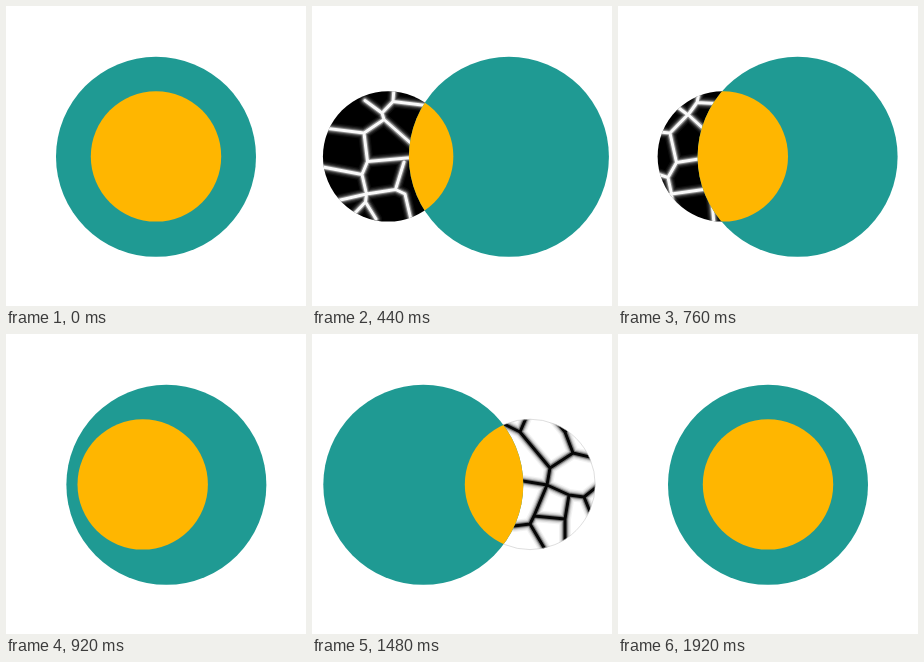
Write an HTML page with a canvas that moves like this. It is 300 by 300 pixels and loops after 1960 ms.

```html
<!DOCTYPE html>
<html lang="en">
<head>
<meta charset="utf-8">
<title>Two circles</title>
<style>
  html, body { margin: 0; width: 100%; height: 100%; overflow: hidden; background: #fff; }
  canvas { display: block; width: 300px; height: 300px; }
</style>
</head>
<body>
<canvas id="stage" width="300" height="300"></canvas>
<script>
const ctx = document.getElementById('stage').getContext('2d');
const LOOP = 1960, STEP = 40, SWAP = 960;
const TEAL = '#1f9a93', ORANGE = '#ffb600';

// Keys: time, offset of the big circle, offset of the small one, skew of the ease
const KEYS = [
  [0, 0, 0, 1],
  [455, 47, -74, 0.85],
  [1480, -38.7, 68, 1],
  [1920, 0, 0, 1]
];

// Cell walls: nodes are x, y and drift; walls are chains of nodes
const LEFT = {
  start: 280,
  nodes: {
    a: [82, 82, 0, 0], b: [82, 95, -2, 1], c: [114, 100, 0, -1],
    d: [70, 106, 0, 2], e: [52, 93, 2, 3], f: [73, 116, -2, -5],
    g: [52, 127, 0, 0], h: [8, 121, 0, 1], i: [54, 155, 3, 1],
    j: [106, 152, 0, -2], k: [50, 167, 0, 3], l: [8, 162, 0, -3],
    m: [55, 188, -1, 0], n: [79, 184, 9, -1], o: [92, 160, 0, -8],
    p: [93, 190, 0, -4], q: [102, 218, -4, 0], r: [53, 196, 1, 0],
    s: [42, 206, 2, 2], t: [64, 213, 0, 0], u: [24, 195, 0, 0],
    v: [102, 141, 0, -2]
  },
  walls: 'abc bdfg ed fv hgikl ij kmnpq no umrs rt'
};
const RIGHT = {
  start: 1160,
  nodes: {
    a: [211, 88, -3, 10], b: [218, 76, -4, 8], c: [192, 90, 0, 0],
    d: [237, 132, 1, 2], e: [261, 117, 0, 2], f: [253, 97, 0, 1],
    g: [240, 82, 0, 0], h: [265, 84, 0, 0], i: [286, 125, 0, 0],
    j: [233, 150, 2, 1], k: [205, 146, 0, 0], l: [255, 160, 2, 1],
    m: [227, 184, -5, -2], n: [254, 186, -1, -1], o: [253, 214, 0, 0],
    p: [272, 163, 0, 0], q: [287, 151, 0, 0], r: [281, 185, 0, 0],
    s: [218, 190, 0, 0], t: [234, 217, 0, 0], u: [202, 192, 0, 0]
  },
  walls: 'cadefg ab fh ei djk jlpq jmsu st mnl no pr'
};

const ease = p => (1 - Math.cos(Math.PI * p)) / 2;

function offsets(t) {
  const n = KEYS.findIndex(k => t < k[0]);
  if (n < 0) return [0, 0];
  const from = KEYS[n - 1], to = KEYS[n];
  const p = ease(((t - from[0]) / (to[0] - from[0])) ** to[3]);
  return [1, 2].map(i => from[i] + (to[i] - from[i]) * p);
}

function disc(x, y, r) {
  ctx.beginPath();
  ctx.arc(x, y, r, 0, Math.PI * 2);
}

function fillDisc(x, y, r, color) {
  disc(x, y, r);
  ctx.fillStyle = color;
  ctx.fill();
}

function drawWalls(net, t, rgb) {
  const age = (t - net.start) / 320;
  ctx.beginPath();
  for (const chain of net.walls.split(' ')) {
    [...chain].forEach((id, i) => {
      const [x, y, dx, dy] = net.nodes[id];
      ctx[i ? 'lineTo' : 'moveTo'](x + dx * age, y + dy * age);
    });
  }
  ctx.lineCap = ctx.lineJoin = 'round';
  // Soft glow built from narrowing strokes
  for (const [width, alpha] of [[12, 0.05], [9.5, 0.09], [7.2, 0.16], [5.2, 0.36], [3, 0.95]]) {
    ctx.lineWidth = width;
    ctx.strokeStyle = `rgba(${rgb},${alpha})`;
    ctx.stroke();
  }
}

function draw(t) {
  const [big, small] = offsets(t);
  const bigDisc = [150 + big, 150.8, 100];
  const smallDisc = [150 + small, 150.4, 65.2];
  const dark = t < SWAP;

  ctx.fillStyle = '#fff';
  ctx.fillRect(0, 0, 300, 300);

  ctx.save();
  disc(...smallDisc);
  ctx.clip();
  ctx.fillStyle = dark ? '#000' : '#fff';
  ctx.fillRect(0, 0, 300, 300);
  if (dark) drawWalls(LEFT, t, '255,255,255');
  else drawWalls(RIGHT, t, '0,0,0');
  ctx.restore();
  if (!dark) {
    disc(...smallDisc);
    ctx.lineWidth = 0.6;
    ctx.strokeStyle = '#c8c8c8';
    ctx.stroke();
  }

  fillDisc(...bigDisc, TEAL);
  ctx.save();
  disc(...bigDisc);
  ctx.clip();
  fillDisc(...smallDisc, ORANGE);
  ctx.restore();
}

const begin = performance.now();
function tick() {
  const t = (performance.now() - begin) % LOOP;
  draw(Math.floor(t / STEP) * STEP);
  requestAnimationFrame(tick);
}
tick();
</script>
</body>
</html>
```
